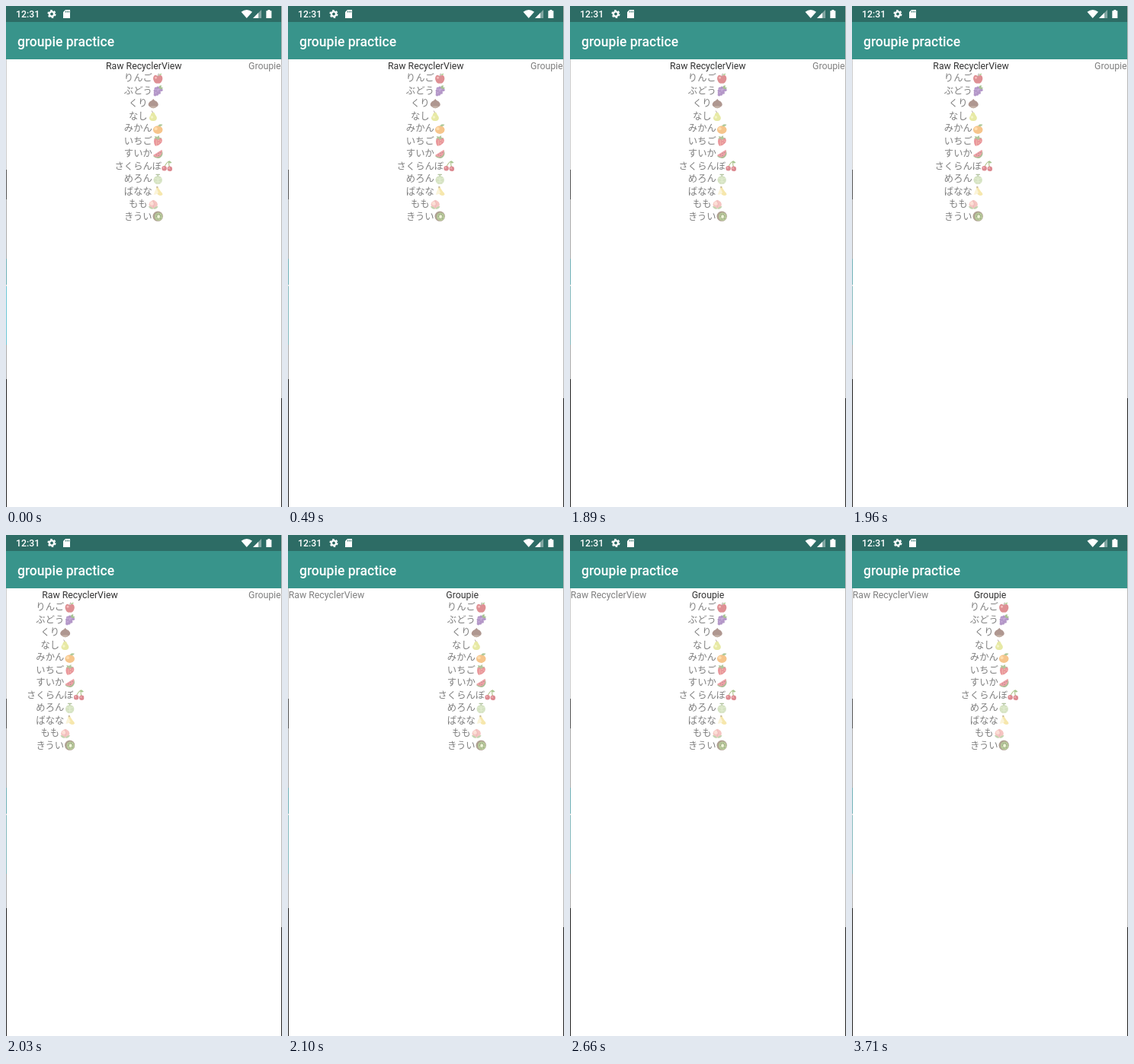
These frames come from a looping animation (362 px wide and 658 px high, 3850 ms). An HTML page:

```html
<!DOCTYPE html>
<html lang="ja">
<head>
<meta charset="utf-8">
<title>groupie practice</title>
<style>
  /* --p: horizontal scroll of the pager in px, one page = 361 */
  @property --p { syntax: '<number>'; inherits: true; initial-value: 0; }

  html, body { margin: 0; width: 100%; height: 100%; overflow: hidden; background: #fff; }
  .stage {
    position: relative; width: 362px; height: 658px; overflow: hidden;
    font: 12.3px/16.5px Roboto, sans-serif;
    animation: swipe 3.85s step-end infinite;
  }
  .stage > * { position: absolute; }
  .status { left: 0; top: 0; width: 362px; height: 21px; background: #2d6c65; }
  .status svg { position: absolute; left: 0; top: -.4px; }
  .clock { position: absolute; left: 13px; top: 2.8px; color: #fff; font-weight: 500; }
  .bar {
    left: 0; top: 20.6px; width: 347px; height: 49.2px; padding-left: 15px;
    background: #38948b; color: #fff; font-size: 17.56px; font-weight: 500; line-height: 52.6px;
  }
  .tab { top: 70.8px; left: 0; white-space: nowrap; }
  .raw {
    transform: translateX(max(.7px, calc(131px - var(--p) * .7258px)));
    animation: dim 3.85s step-end infinite;
  }
  .grp {
    transform: translateX(min(318px, calc(159.7px + (361 - var(--p)) * .881px)));
    animation: lit 3.85s step-end infinite;
  }
  .pager { left: 0; top: 86px; width: 722px; display: flex; transform: translateX(calc(var(--p) * -1px)); }
  .page { width: 361px; color: #7f7f7f; font-family: 'Noto Sans CJK JP', 'Noto Sans CJK', sans-serif; }
  .row { display: flex; justify-content: center; height: 16.5px; }
  .row svg { width: 14.4px; height: 14.4px; margin-top: 1.8px; opacity: .54; }
  .edge { top: 0; width: 1px; height: 658px; }
  .left {
    left: 0;
    background: linear-gradient(#2d6c65 21px, #38948b 0 70px, #ccc 0 215px, #555 0 254px, #aaa 0 332px,
      #6fb0b6 0 366px, #ddd 0 368px, #84b9bd 0 445px, #aaa 0 490px, #222 0);
  }
  .right { left: 361px; background: linear-gradient(#b8b8b8 515px, #222 0); }
  .glow { left: 0; top: 368px; width: 1px; height: 77px; background: #6cc6d6; animation: glow 3.85s step-end infinite; }

  @keyframes swipe {
    0% { --p: 0; }
    50.9% { --p: 34; }
    52.72% { --p: 115.5; }
    54.54% { --p: 307; }
    56.36% { --p: 355; }
    58.18%, 100% { --p: 361; }
  }
  @keyframes dim { 0% { color: #333; } 54.54%, 100% { color: #7f7f7f; } }
  @keyframes lit { 0% { color: #7f7f7f; } 54.54%, 100% { color: #333; } }
  @keyframes glow { 0% { opacity: 1; } 12.72%, 100% { opacity: 0; } }
</style>
</head>
<body>
<div class="stage">
  <div class="pager"></div>
  <div class="tab raw">Raw RecyclerView</div>
  <div class="tab grp">Groupie</div>
  <div class="status">
    <span class="clock">12:31</span>
    <svg width="362" height="21" fill="#fff">
      <g fill="none" stroke="#fff">
        <circle cx="60" cy="10.5" r="3.1" stroke-width="2.4"/>
        <circle cx="60" cy="10.5" r="4.8" stroke-width="1.6" stroke-dasharray="2.6 2.426"/>
      </g>
      <path d="M78 5h6v11h-9V8z"/>
      <path d="M78.5 6.5v2M80.5 6.5v2M82.5 6.5v2" stroke="#2d6c65"/>
      <path d="M308.5 7.8Q315.7 2.4 323 7.8L315.7 16z"/>
      <path d="M335 5v11h-11z" opacity=".4"/>
      <path d="M331 9v7h-7z"/>
      <path d="M341.3 6.3h2V5h3v1.3h2V16h-7z"/>
    </svg>
  </div>
  <div class="bar">groupie practice</div>
  <div class="edge left"></div>
  <div class="edge right"></div>
  <div class="glow"></div>
</div>
<script>
  const path = (d, fill) => `<path d="${d}" fill="${fill}"/>`;
  const line = (d, color, w = 1) => `<path d="${d}" fill="none" stroke="${color}" stroke-width="${w}" stroke-linecap="round"/>`;
  const dot = (x, y, r, fill) => `<circle cx="${x}" cy="${y}" r="${r}" fill="${fill}"/>`;
  const dots = (points, r, fill) => points.map(([x, y]) => dot(x, y, r, fill)).join('');

  const fruits = [
    ['りんご', path('M8 5C12 0 16 5 14.5 10C13 15 10 16 8 15C6 16 3 15 1.5 10C0 5 4 0 8 5z', '#c4343a')
      + line('M8 5Q8 3 9 1', '#5d4037') + path('M9 3Q11 0 14 1Q12 4 9 3z', '#689f38') + dot(5, 7, 1.6, '#ef8b8b')],
    ['ぶどう', dots([[5, 5], [8, 4], [11, 5], [4, 8], [7, 8], [10, 8], [13, 7], [4, 11], [7, 11], [10, 11], [4, 14], [7, 13]], 2.2, '#75429b')
      + dots([[5, 6], [8, 8], [5, 11], [10, 6]], 1, '#a06cc0') + path('M9 4L10 1L13 0L13 3L16 4L13 6z', '#5d8f3a')],
    ['くり', path('M8 1Q10 4 13 5Q17 9 14 12Q8 17 2 12Q-1 9 3 5Q6 4 8 1z', '#6d4034')
      + path('M3 12Q8 11 13 12Q12 14.500 8 15Q4 14.500 3 12z', '#94705c')],
    ['なし', path('M7 3C10 2 10 6 12 8C15 12 12 16 8 15.5C3 16 1 12 3 9C5 7 4 4 7 3z', '#d3d85a')
      + line('M7 3L6 1', '#6d4c41') + dot(6, 10, 2, '#ecec9a')],
    ['みかん', '<ellipse cx="8" cy="9.5" rx="7" ry="6" fill="#f0952c"/>' + dot(5, 8, 2.4, '#ffc16b')
      + path('M8 4Q10 0 15 2Q13 6 8 4z', '#6c9c45')],
    ['いちご', path('M3 5Q8 1 13 4Q16 8 12 12Q8 16 4 15Q1 10 3 5z', '#d8404a')
      + dots([[6, 8], [9, 7], [12, 8], [6, 11], [9, 11], [6, 14]], .6, '#ffca88')
      + path('M2 6L4 3L3 1L7 2L10 0L10 3L14 4L10 5L7 7L6 4z', '#6f9848')],
    ['すいか', path('M1 11L14 3Q17 10 11 14Q5 16 1 11z', '#658b40') + path('M1 10L14 2Q15 9 10 12Q5 14 1 10z', '#e0505a')
      + dots([[6, 9.5], [9, 7], [12, 6], [9, 10.5]], .7, '#4e3733')],
    ['さくらんぼ', line('M4 10Q6 4 11 1Q10 6 12 10', '#6b8e23', 1.2) + path('M9 2Q12 -1 15 3Q12 5 9 2z', '#5f9838')
      + dots([[4, 11.5], [12, 12]], 3.6, '#c02a38') + dots([[3, 10.5], [11, 11]], 1, '#f28b8b')],
    ['めろん', dot(8, 9.5, 6.3, '#b2cb90') + line('M3 7Q8 10 13 7M4 13Q8 9 12 13M8 4V15', '#d4e5b5', .8)
      + line('M8 4V1.5M5.5 1.5H10.5', '#708f50', 1.4)],
    ['ばなな', path('M6 1L8 1Q9 4 12 8Q15 11 15 13Q12 16 8 13Q4 9 6 1z', '#f0d468')
      + path('M6 4Q3 8 2 13Q6 14 9 10z', '#f8ebba') + path('M6 1L8 1L8 3L6 3z', '#8a7350')],
    ['もも', path('M8 2Q10 2 13 5Q16 10 12 13Q8 16 4 13Q0 10 3 5Q6 3 8 2z', '#ee9690')
      + dot(6, 7, 2.8, '#fbc5b4') + line('M8 3Q11 8 8 13', '#d9747a', .8)
      + path('M8 15Q3 16 1 11Q6 11 8 15Q10 11 15 11Q13 16 8 15z', '#8fb06c')],
    ['きうい', dot(8, 8, 7.4, '#6b5236') + '<ellipse cx="9" cy="8.5" rx="5.7" ry="6" fill="#7ea046"/>'
      + '<ellipse cx="9" cy="8.5" rx="2" ry="2.4" fill="#e6edc0"/>'
      + dots([[6, 8], [7, 5.5], [10, 5], [12, 7.5], [11.5, 11], [8, 12]], .7, '#2f3a15')],
  ];

  const rows = fruits.map(([name, art]) =>
    `<div class="row"><span>${name}</span><svg viewBox="0 0 16 16">${art}</svg></div>`).join('');
  document.querySelector('.pager').innerHTML = `<div class="page">${rows}</div>`.repeat(2);
</script>
</body>
</html>
```
